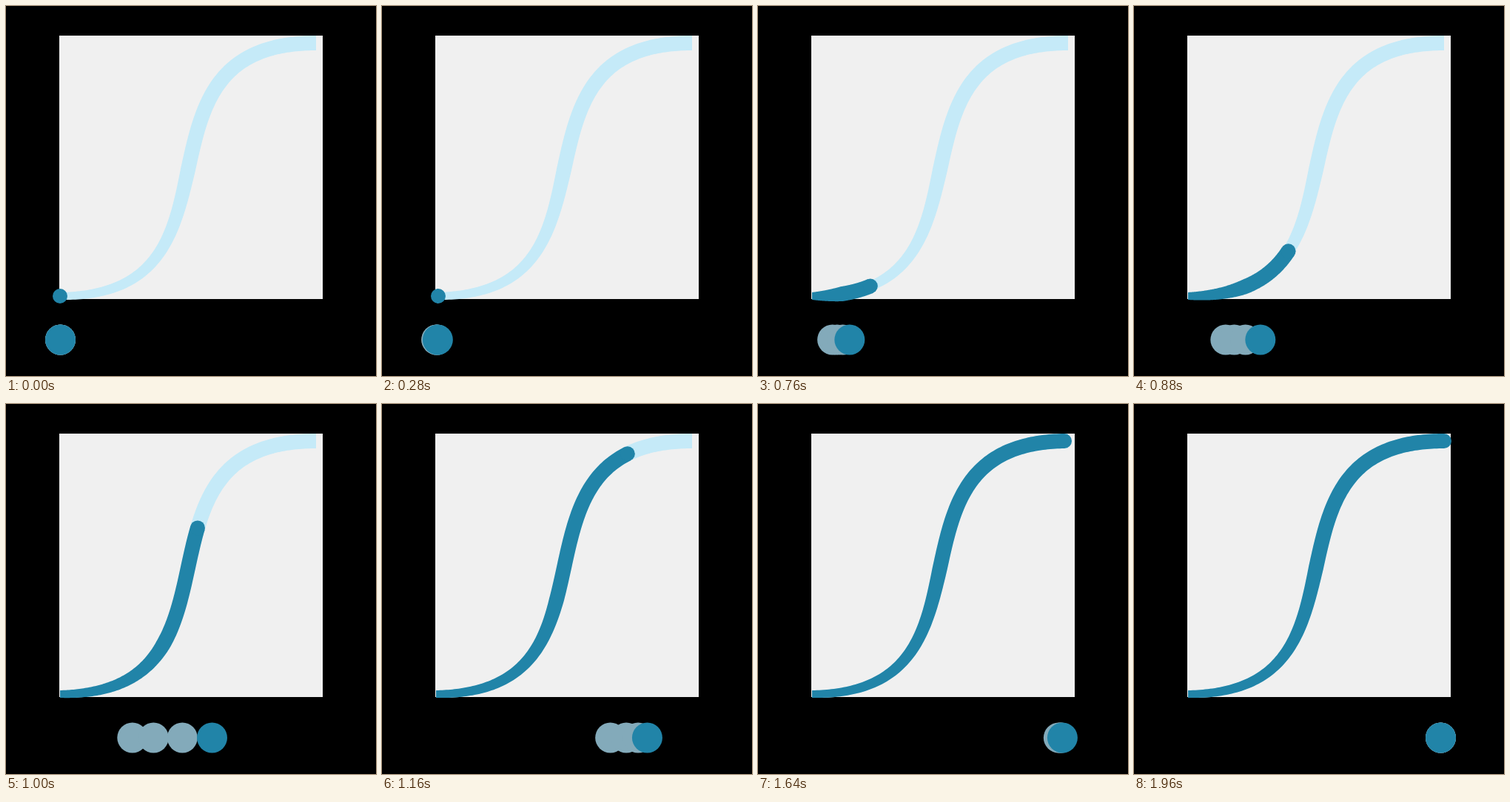
An HTML page with a canvas that plays this animation: 500x500 px, repeating every 3000 ms.

```html
<!DOCTYPE html>
<html lang="en">
<head>
<meta charset="utf-8">
<title>Ease in and out</title>
<style>
  html, body { margin: 0; width: 100%; height: 100%; overflow: hidden; background: #000; }
  canvas { display: block; width: 500px; height: 500px; }
</style>
</head>
<body>
<canvas id="stage" width="500" height="500"></canvas>
<script>
const ctx = document.getElementById('stage').getContext('2d');

const LOOP = 3000, STEP = 40;
const MOVE_START = 112, MOVE_TIME = 1750;
const PANEL = '#f0f0f0', TRACK = '#c5eaf8', ACCENT = '#2184a8', GHOST = '#83aaba';
const WIDTH = 20, GHOSTS = 3;

const bezier = (a, b, c, d, u) => {
  const v = 1 - u;
  return a * v * v * v + 3 * b * v * v * u + 3 * c * v * u * u + d * u * u * u;
};

// Timing curve (0.8, 0, 0.167, 1), solved by bisection
function ease(x) {
  if (x <= 0) return 0;
  if (x >= 1) return 1;
  let low = 0, high = 1;
  for (let i = 0; i < 30; i++) {
    const mid = (low + high) / 2;
    if (bezier(0, 0.8, 0.167, 1, mid) < x) low = mid; else high = mid;
  }
  return bezier(0, 0, 1, 1, low);
}

const progress = time => ease((time - MOVE_START) / MOVE_TIME);

// The S-curve, sampled with its running length
const curve = [];
for (let i = 0; i <= 600; i++) {
  const u = i / 600;
  const p = { x: bezier(73, 344.6, 147.4, 419, u), y: bezier(392, 392, 50, 50, u), len: 0 };
  const last = curve[i - 1];
  if (last) p.len = last.len + Math.hypot(p.x - last.x, p.y - last.y);
  curve.push(p);
}
const total = curve[curve.length - 1].len;

function pointAt(len) {
  const i = Math.max(1, curve.findIndex(p => p.len >= len));
  const a = curve[i - 1], b = curve[i];
  const k = (len - a.len) / (b.len - a.len);
  const angle = Math.atan2(b.y - a.y, b.x - a.x);
  return { x: a.x + (b.x - a.x) * k, y: a.y + (b.y - a.y) * k, angle };
}

// Stroke that grows from half to full width over the first half of its length
function taperedStroke(len, color) {
  const sides = [[], []];
  for (let i = 0; i <= 160; i++) {
    const k = i / 160;
    const p = pointAt(len * k);
    const half = WIDTH / 2 * Math.min(1, 0.5 + k);
    const dx = -Math.sin(p.angle) * half, dy = Math.cos(p.angle) * half;
    sides[0].push([p.x + dx, p.y + dy]);
    sides[1].unshift([p.x - dx, p.y - dy]);
  }
  ctx.beginPath();
  sides.flat().forEach(([x, y]) => ctx.lineTo(x, y));
  ctx.fillStyle = color;
  ctx.fill();
}

function disc(x, y, r, color) {
  ctx.beginPath();
  ctx.arc(x, y, r, 0, Math.PI * 2);
  ctx.fillStyle = color;
  ctx.fill();
}

function ball(time, color) {
  disc(73.5 + 341 * progress(time), 451, 20.5, color);
}

function draw(time) {
  ctx.fillStyle = '#000';
  ctx.fillRect(0, 0, 500, 500);
  ctx.fillStyle = PANEL;
  ctx.fillRect(72, 40, 356, 356);

  const len = total * progress(time);
  taperedStroke(total, TRACK);
  if (len > 0) taperedStroke(len, ACCENT);
  const tip = pointAt(len);
  disc(tip.x, tip.y, WIDTH / 2, ACCENT);

  for (let i = GHOSTS; i > 0; i--) ball(time - i * STEP, GHOST);
  ball(time, ACCENT);
}

function tick() {
  const time = performance.now() % LOOP;
  draw(Math.floor(time / STEP) * STEP);
  requestAnimationFrame(tick);
}
tick();
</script>
</body>
</html>
```
